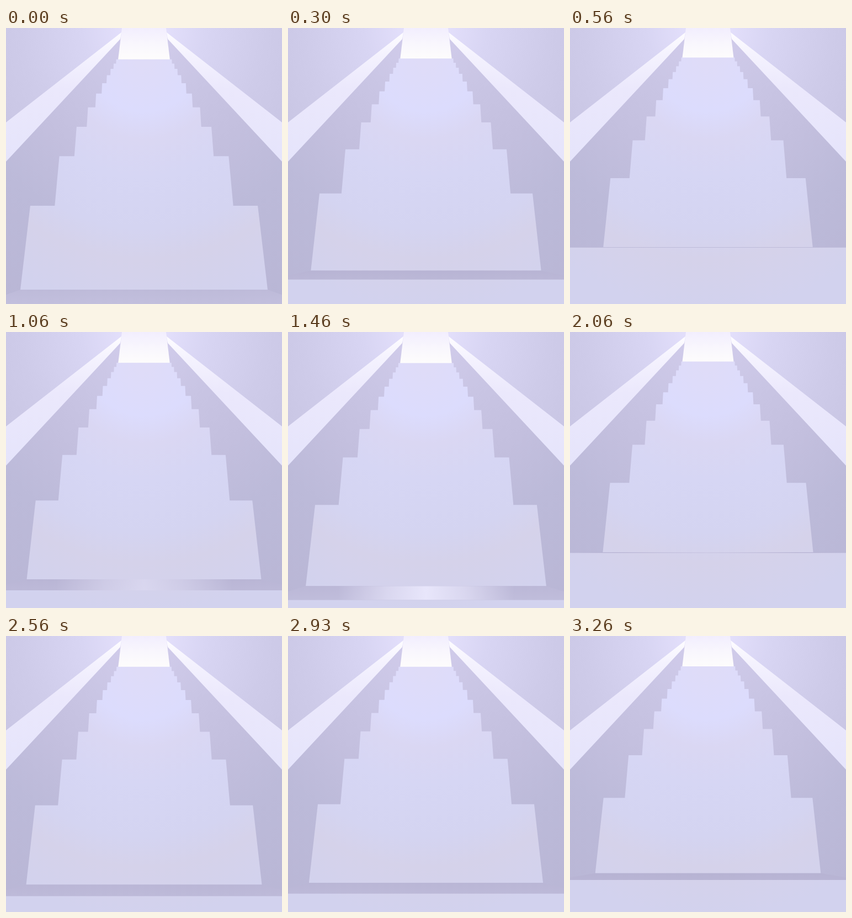
These frames come from a looping animation (500 by 500 pixels, 3300 ms). An HTML page:

```html
<!DOCTYPE html>
<html lang="en">
<head>
<meta charset="utf-8">
<title>Endless stairs</title>
<style>
  html, body { margin: 0; width: 100%; height: 100%; overflow: hidden; background: #c3c0de; }
  svg { display: block; width: 100vw; height: 100vh; }
</style>
</head>
<body>
<svg viewBox="0 0 500 500">
  <defs>
    <radialGradient id="wall" gradientUnits="userSpaceOnUse" cx="250" cy="0" r="560">
      <stop offset=".07" stop-color="#e3dffb"/>
      <stop offset=".2" stop-color="#d8d5f3"/>
      <stop offset=".4" stop-color="#cecbe9"/>
      <stop offset=".55" stop-color="#c9c6e4"/>
      <stop offset="1" stop-color="#bab6d5"/>
    </radialGradient>
    <radialGradient id="well" gradientUnits="userSpaceOnUse" cx="250" cy="0" r="560">
      <stop offset=".08" stop-color="#d0cbea"/>
      <stop offset=".25" stop-color="#c9c5e4"/>
      <stop offset=".45" stop-color="#c3bfde"/>
      <stop offset=".65" stop-color="#bcbad9"/>
      <stop offset="1" stop-color="#b9b6d5"/>
    </radialGradient>
    <linearGradient id="rail" gradientUnits="userSpaceOnUse" x1="0" y1="0" x2="0" y2="245">
      <stop offset=".04" stop-color="#fdfcff"/>
      <stop offset=".2" stop-color="#f4f2fe"/>
      <stop offset=".45" stop-color="#ebe8fc"/>
      <stop offset="1" stop-color="#e5e4fb"/>
    </linearGradient>
    <linearGradient id="door" gradientUnits="userSpaceOnUse" x1="0" y1="0" x2="0" y2="60">
      <stop offset="0" stop-color="#f2eefe"/>
      <stop offset=".5" stop-color="#f9f7fd"/>
      <stop offset="1" stop-color="#fefdfc"/>
    </linearGradient>
    <radialGradient id="step" gradientUnits="userSpaceOnUse" cx="250" cy="50" r="460">
      <stop offset=".04" stop-color="#dfdcf8"/>
      <stop offset=".22" stop-color="#dcdcfd"/>
      <stop offset=".33" stop-color="#dad7f3"/>
      <stop offset=".48" stop-color="#d6d6f4"/>
      <stop offset=".68" stop-color="#d4d4f1"/>
      <stop offset=".8" stop-color="#d5d2ea"/>
      <stop offset="1" stop-color="#d2d2ee"/>
    </radialGradient>
    <linearGradient id="tread" gradientUnits="userSpaceOnUse" x1="0" y1="425" x2="0" y2="500">
      <stop offset="0" stop-color="#b6b2d2"/>
      <stop offset="1" stop-color="#c2bfdd"/>
    </linearGradient>
    <linearGradient id="gloss" gradientUnits="userSpaceOnUse" x1="90" y1="0" x2="410" y2="0">
      <stop offset="0" stop-color="#e8e6fb" stop-opacity="0"/>
      <stop offset=".28" stop-color="#e8e6fb" stop-opacity=".65"/>
      <stop offset=".5" stop-color="#e8e6fb"/>
      <stop offset=".72" stop-color="#e8e6fb" stop-opacity=".65"/>
      <stop offset="1" stop-color="#e8e6fb" stop-opacity="0"/>
    </linearGradient>
  </defs>
  <rect width="500" height="500" fill="url(#wall)"/>
  <path d="M0 242 207 18H293L500 242V500H0Z" fill="url(#well)"/>
  <path d="M0 171 209 8 207 20 0 242ZM500 171 291 8 293 20 500 242Z" fill="url(#rail)"/>
  <path d="M210 0H290L297.5 62H202.5Z" fill="url(#door)"/>
  <g id="stairs"></g>
</svg>
<script>
const LOOP = 3300;
const COUNT = 11;
const FAR = 11.47;      // nearest depth the top step may reach
const START = 0.909;    // depth phase at time zero
const RATE = 0.0892;    // steps climbed per tick

const stairs = document.getElementById('stairs');

function addPath(fill) {
  const el = document.createElementNS('http://www.w3.org/2000/svg', 'path');
  el.setAttribute('fill', `url(#${fill})`);
  return stairs.appendChild(el);
}

const steps = Array.from({ length: COUNT }, () => ({
  riser: addPath('step'), tread: addPath('tread'), gloss: addPath('gloss')
}));

// Perspective edges: half width and height on screen for a given depth
const topEdge = p => ({ w: 599.5 / p, y: -29 + 1021 / p });

function footEdge(p) {
  const q = p - 0.2326;
  return { w: 599.5 / q, y: (1021 - 29 * p + 332.1) / q };
}

function quad(a, b) {
  const pt = (x, y) => `${x.toFixed(2)} ${y.toFixed(2)}`;
  return `M${pt(250 - a.w, a.y)}L${pt(250 + a.w, a.y)}L${pt(250 + b.w, b.y)}L${pt(250 - b.w, b.y)}Z`;
}

// Thirty ticks a second, on a 10 ms clock
const tickAt = t => Math.floor((3 * (Math.floor(t / 10) + 1) - 1) / 10);

function shine(n) {
  const u = (n * 100 / 3 - 700) / 1600;
  return u > 0 && u < 1 ? Math.sin(Math.PI * u) : 0;
}

function draw(t) {
  const n = tickAt(t);
  const phase = START - RATE * n - FAR;
  const far = FAR + phase - Math.floor(phase);
  const glow = shine(n);
  steps.forEach((s, i) => {
    const p = far - i;
    const foot = footEdge(p);
    s.riser.setAttribute('d', quad(topEdge(p), foot));
    const next = p > 1.5 ? topEdge(p - 1) : foot;
    const d = next.y > foot.y ? quad(foot, next) : '';
    s.tread.setAttribute('d', d);
    s.gloss.setAttribute('d', d);
    s.gloss.setAttribute('opacity', glow.toFixed(3));
  });
}

let begin = null;
function frame(now) {
  if (begin === null) begin = now;
  draw((now - begin) % LOOP);
  requestAnimationFrame(frame);
}
draw(0);
requestAnimationFrame(frame);
</script>
</body>
</html>
```
